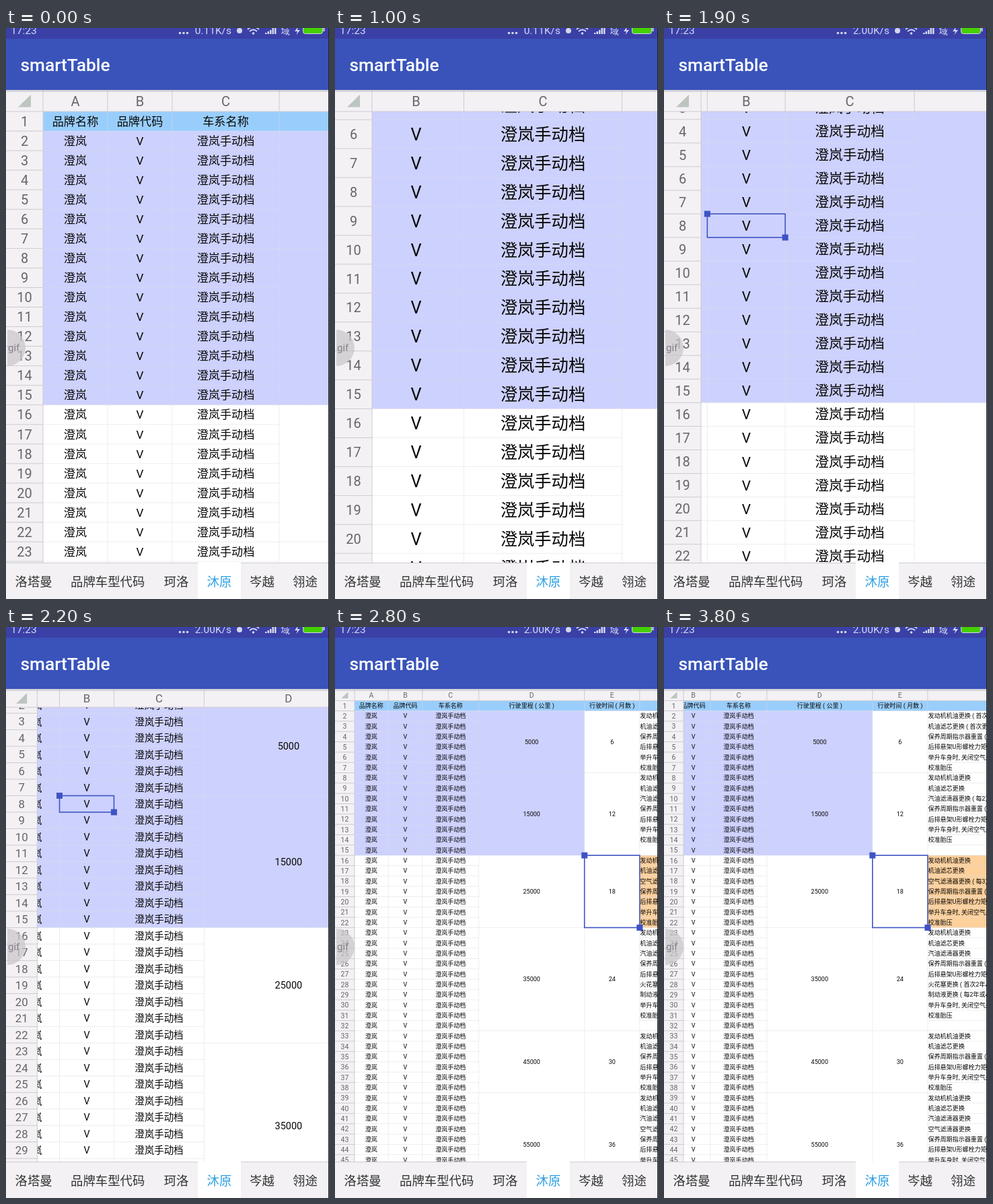
Animation of 480 by 848 pixels, one loop 3900 ms. Source, as an HTML page:

```html
<!DOCTYPE html>
<html lang="zh">
<head>
<meta charset="utf-8">
<title>smartTable</title>
<style>
  html, body { margin: 0; width: 100%; height: 100%; overflow: hidden; background: #fff; }
  svg { display: block; width: 480px; height: 848px; }
  text { font-family: Roboto, "Noto Sans CJK SC", "Noto Sans CJK", sans-serif; }
  .mid { text-anchor: middle; }
  .grid { fill: none; stroke: #dcdce6; stroke-width: 1; stroke-dasharray: 1 1; vector-effect: non-scaling-stroke; }
  .rule { stroke: #cdcbd0; stroke-width: 1; }
</style>
</head>
<body>
<svg id="stage" viewBox="0 0 480 848" xmlns="http://www.w3.org/2000/svg">
  <defs>
    <clipPath id="view"><rect y="92" width="480" height="702"/></clipPath>
  </defs>
  <rect width="480" height="848" fill="#fff"/>
  <g clip-path="url(#view)">
    <g id="sheet"></g>
    <g id="pick" fill="#3e54c4">
      <rect id="frame" fill="none" stroke="#3e54c4" stroke-width="1.6"/>
      <rect id="knobA" width="9" height="9"/>
      <rect id="knobB" width="9" height="9"/>
    </g>
    <rect id="side" y="92" height="702" fill="#f4f1f5"/>
    <g id="nums" fill="#666"></g>
    <rect id="top" y="92" width="480" fill="#f4f1f5"/>
    <g id="heads" fill="#666"></g>
    <rect id="corner" y="92" fill="#f4f1f5"/>
    <path id="mark" d="M37 6V24.500H18Z" fill="#bcc5c0"/>
    <line id="sideRule" class="rule" y1="93" y2="794"/>
    <line id="topRule" class="rule" x2="480"/>
    <path d="M0 448A27 27 0 0 1 0 502Z" transform="translate(2)" fill="#c9c7cb" opacity=".72"/>
    <text x="3" y="480" font-size="15" fill="#85838a">gif</text>
  </g>

  <rect width="480" height="92" fill="#3953ba"/>
  <rect width="480" height="16" fill="#3a40a6"/>
  <rect y="92" width="480" height="3" fill="#556" opacity=".18"/>
  <text x="21.500" y="64" font-size="26.300" font-weight="500" fill="#fff">smartTable</text>
  <g fill="#d5d6ee" font-size="15.500">
    <text x="7" y="9">17:23</text>
    <circle cx="258.500" cy="7.500" r="1.800"/><circle cx="264" cy="7.500" r="1.800"/><circle cx="269.500" cy="7.500" r="1.800"/>
    <text id="speed" x="335" y="9" text-anchor="end"></text>
    <circle cx="347" cy="4" r="4"/>
    <path d="M359 2Q367.500 -5 376 2M362 5Q367.500 0 373 5" fill="none" stroke="#d5d6ee" stroke-width="1.800"/>
    <circle cx="367.500" cy="8" r="1.800"/>
    <path d="M385 9v-2h2.500v2zM388.500 9v-4h2.500v4zM392 9v-6h2.500v6zM395.500 9v-9h2.500v9zM399 9v-11h2.500v11z"/>
    <text x="408.500" y="9" font-size="13.500">域</text>
    <path d="M434 -2L429 5H433L431.500 10L437 3H433Z"/>
    <rect x="441.500" y="-5" width="29" height="13.500" rx="3" fill="#45d000" stroke="#d5d6ee"/>
    <rect x="471.500" y="0" width="2" height="5"/>
  </g>

  <rect y="794" width="480" height="54" fill="#f3f1f4"/>
  <rect x="285" y="794" width="64" height="54" fill="#fff"/>
  <path class="rule" d="M0 794.500H285M349 794.500H480"/>
  <g id="tabs" font-size="18.400"></g>
  <rect x="479" width="1" height="848" fill="#222"/>
</svg>
<script>
const $ = id => document.getElementById(id);
const ROW = 29.05, ROWS = 48, LOOP = 3900, STEP = 100;
const edges = [0, 96, 192, 351, 648.5, 804, 1240];
const MODEL = '澄岚';

function set(el, attrs) {
  for (const k in attrs) el.setAttribute(k, attrs[k]);
  return el;
}
function add(parent, tag, attrs, text) {
  const el = set(document.createElementNS('http://www.w3.org/2000/svg', tag), attrs);
  if (text !== undefined) el.textContent = text;
  return parent.appendChild(el);
}

// Work items in column F, one key letter per row
const jobs = {
  a: '发动机机油更换', A: '发动机机油更换 ( 首次更换 )',
  b: '机油滤芯更换', B: '机油滤芯更换 ( 首次更换 )',
  c: '保养周期指示器重置 ( 每次保养 )',
  d: '后排悬架U形螺栓力矩检查',
  e: '举升车身时, 关闭空气悬架',
  f: '校准胎压',
  g: '汽油滤清器更换', G: '汽油滤清器更换 ( 每2万公里 )',
  h: '空气滤清器更换', H: '空气滤清器更换 ( 每3万公里 )',
  i: '火花塞更换 ( 首次2年/4万公里 )',
  j: '制动液更换 ( 每2年或4万公里 )'
};
const plan = 'ABcdefabGcdef-abHcdefabgcdijef-abcdefabghcde---';
const spans = [[2, 7], [8, 15], [16, 22], [23, 32], [33, 38], [39, 48]];
const rowTop = r => (r - 1) * ROW;
const colMid = c => (edges[c] + edges[c + 1]) / 2;

function buildSheet() {
  const sheet = $('sheet');
  const fill = (c0, c1, r0, r1, color) => add(sheet, 'rect', {
    x: edges[c0], y: rowTop(r0), width: edges[c1] - edges[c0],
    height: rowTop(r1 + 1) - rowTop(r0), fill: color
  });
  const word = (x, y, text, cls = 'mid') => add(sheet, 'text', {
    x, y: y + 6.2, 'font-size': 17.15, fill: '#080808', class: cls
  }, text);

  fill(0, 6, 1, 1, '#99cefc');
  fill(0, 4, 2, 15, '#cdd1fd');
  fill(5, 6, 16, 22, '#fdd09c');

  let d = '';
  for (let r = 2; r <= ROWS + 1; r++) {
    d += `M0 ${rowTop(r)}H${edges[3]}M${edges[5]} ${rowTop(r)}H${edges[6]}`;
  }
  for (const [r0] of spans) d += `M${edges[3]} ${rowTop(r0)}H${edges[5]}`;
  for (const x of edges) d += `M${x} 0V${rowTop(ROWS + 1)}`;
  add(sheet, 'path', { d, class: 'grid' });

  ['品牌名称', '品牌代码', '车系名称', '行驶里程 ( 公里 )', '行驶时间 ( 月数 )', '保养项目']
    .forEach((t, c) => word(colMid(c), ROW / 2, t));
  for (let r = 2; r <= ROWS; r++) {
    const y = rowTop(r) + ROW / 2;
    [MODEL, 'V', MODEL + '手动档'].forEach((t, c) => word(colMid(c), y, t));
    const job = jobs[plan[r - 2]];
    if (job) word(edges[5] + 1, y, job, '');
  }
  spans.forEach(([r0, r1], i) => {
    const y = (rowTop(r0) + rowTop(r1 + 1)) / 2;
    word(colMid(3), y, 5000 + i * 10000);
    word(colMid(4), y, 6 * (i + 1));
  });
}

const nums = [], heads = [];
function buildHeaders() {
  for (let r = 1; r <= ROWS; r++) nums.push({
    text: add($('nums'), 'text', { class: 'mid' }, r),
    rule: add($('nums'), 'line', { class: 'rule', x1: 0 })
  });
  [...'ABCDEF'].forEach(t => heads.push({
    text: add($('heads'), 'text', { class: 'mid' }, t),
    rule: add($('heads'), 'line', { class: 'rule', y1: 93 })
  }));
  [['洛塔曼', 13.5], ['品牌车型代码', 96], ['珂洛', 234.5], ['沐原', 298.5], ['岑越', 362], ['翎途', 426]]
    .forEach(([t, x], i) => add($('tabs'), 'text', { x, y: 829, fill: i === 3 ? '#2b9fe2' : '#333' }, t));
}

// time, scale, left of column A, top of row 1
const poses = [
  [0, 1, 55, 124],
  [500, 1.2656, -26.8, 11.5],
  [600, 1.2656, -26.8, 11.5],
  [1000, 1.478, -92.3, -78.5],
  [1400, 1.695, -150.9, -164],
  [1500, 1.695, -150.9, -164],
  [1900, 1.2065, -51.5, 30.7],
  [2400, 0.6006, 32, 111.4],
  [2500, 0.5277, 28.5, 109.2],
  [2900, 0.5277, 28.5, 109.2],
  [3200, 0.5277, 7.8, 109.2],
  [3800, 0.5277, -32.4, 109.2]
];
function poseAt(t) {
  const i = poses.findIndex(p => p[0] >= t);
  if (i < 1) return poses[i < 0 ? poses.length - 1 : 0].slice(1);
  const a = poses[i - 1], b = poses[i], k = (t - a[0]) / (b[0] - a[0]);
  return [1, 2, 3].map(n => a[n] + (b[n] - a[n]) * k);
}

function drawPick(t, s, x, y) {
  $('pick').style.display = t < 1600 ? 'none' : '';
  const [c, r0, r1] = t < 2800 ? [1, 8, 8] : [4, 16, 22];
  const x0 = x + edges[c] * s, x1 = x + edges[c + 1] * s;
  const y0 = y + rowTop(r0) * s, y1 = y + rowTop(r1 + 1) * s;
  set($('frame'), { x: x0, y: y0, width: x1 - x0, height: y1 - y0 });
  set($('knobA'), { x: x0 - 4.5, y: y0 - 4.5 });
  set($('knobB'), { x: x1 - 4.5, y: y1 - 4.5 });
}

function draw(t) {
  const [s, x, y] = poseAt(t);
  const h = Math.min(1, s), w = 55 * h, bottom = 93 + 31 * h, size = 20 * h;
  $('sheet').setAttribute('transform', `translate(${x} ${y}) scale(${s})`);
  drawPick(t, s, x, y);

  nums.forEach(({ text, rule }, i) => {
    const y1 = y + (i + 1) * ROW * s;
    set(text, { x: w / 2, y: y1 - ROW * s / 2 + size * .36, 'font-size': size });
    set(rule, { x2: w, y1, y2: y1 });
  });
  heads.forEach(({ text, rule }, i) => {
    const x1 = x + edges[i + 1] * s;
    set(text, { x: x + colMid(i) * s, y: 93 + 15.5 * h + size * .36, 'font-size': size });
    set(rule, { x1, x2: x1, y2: bottom });
  });
  set($('side'), { width: w });
  set($('top'), { height: bottom - 92 });
  set($('corner'), { width: w, height: bottom - 92 });
  set($('mark'), { transform: `translate(0 93) scale(${h})` });
  set($('sideRule'), { x1: w, x2: w });
  set($('topRule'), { y1: bottom, y2: bottom });
  $('speed').textContent = t < 1900 ? '0.11K/s' : '2.00K/s';
}

buildSheet();
buildHeaders();
const start = performance.now();
function tick() {
  const t = (performance.now() - start) % LOOP;
  draw(Math.floor(t / STEP) * STEP);
  requestAnimationFrame(tick);
}
tick();
</script>
</body>
</html>
```
